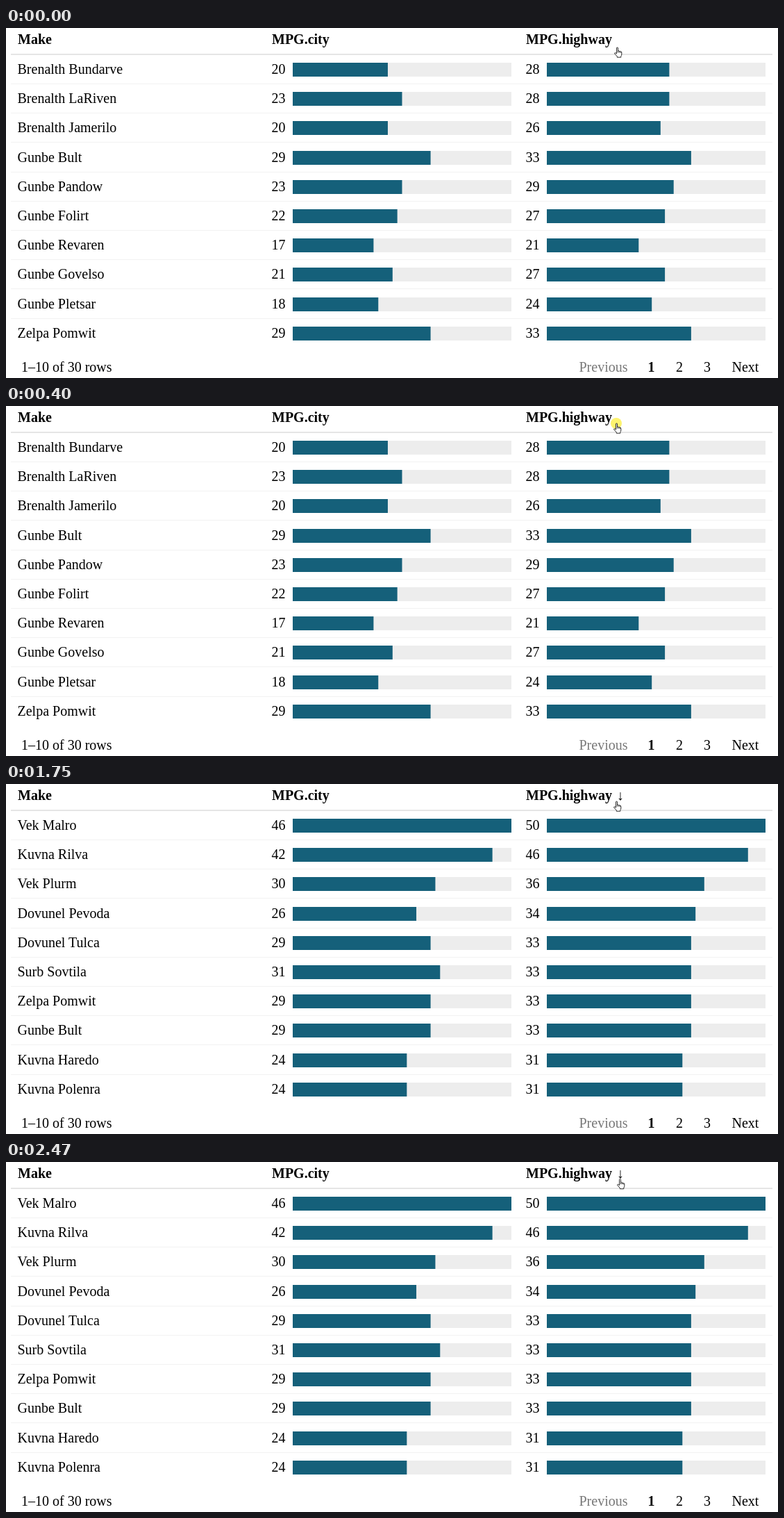
Write an HTML page that moves like this. It is 1112 px wide and 504 px high and loops after 2.54 s.

```html
<!DOCTYPE html>
<html lang="en">
<head>
<meta charset="utf-8">
<title>Sortable table</title>
<style>
html, body { margin: 0; width: 100%; height: 100%; overflow: hidden; background: #fff; }
svg { display: block; font: 20px "Liberation Serif", "Times New Roman", serif; }
.bold { font-weight: bold; }
.middle { text-anchor: middle; }
.muted { fill: #777; }
#click { fill: #fdf36f; mix-blend-mode: multiply; }
#hand { fill: #fff; stroke: #111; stroke-width: .9; stroke-linejoin: round; }
</style>
</head>
<body>
<svg id="stage" width="1112" height="504" viewBox="0 0 1112 504"></svg>
<script>
const LOOP = 2540, PITCH = 42.2, BAR_WIDTH = 315;
const COLUMNS = [16.5, 382.5, 748.5];

// make, city, highway
const cars = [
  ["Brenalth Bundarve", 20, 28], ["Brenalth LaRiven", 23, 28], ["Brenalth Jamerilo", 20, 26],
  ["Gunbe Bult", 29, 33], ["Gunbe Pandow", 23, 29], ["Gunbe Folirt", 22, 27],
  ["Gunbe Revaren", 17, 21], ["Gunbe Govelso", 21, 27], ["Gunbe Pletsar", 18, 24],
  ["Zelpa Pomwit", 29, 33], ["Surb Sovtila", 31, 33], ["Surb Lamvu", 22, 27],
  ["Surb Nevilora", 15, 20], ["Surb Bruwo_Galitore", 18, 26], ["Vek Malro", 46, 50],
  ["Vek Plurm", 30, 36], ["Kuvna Polenra", 24, 31], ["Kuvna Rilva", 42, 46],
  ["Kuvna Haredo", 24, 31], ["Dovunel Tulca", 29, 33], ["Dovunel Pevoda", 26, 34],
  ["Jolistri K83", 17, 22], ["Tovas TP400", 18, 24]
];
const ascending = [...cars].sort((a, b) => a[2] - b[2]);
const descending = [...ascending].reverse();

const text = (x, y, content, cls = "") => `<text x="${x}" y="${y}" class="${cls}">${content}</text>`;
const rect = (x, y, w, h, fill) => `<rect x="${x}" y="${y}" width="${w}" height="${h}" fill="${fill}"/>`;

function meter(column, value, max, y) {
  const x = COLUMNS[column] + 30.5, top = Math.round(50 + y);
  return text(COLUMNS[column], Math.round(66 + y), value)
    + rect(x, top, BAR_WIDTH, 20, "#ededed")
    + rect(x, top, BAR_WIDTH * value / max, 20, "#15607a");
}

function page(list, arrow) {
  const rows = list.slice(0, 10).map(([make, city, highway], i) => {
    const y = i * PITCH;
    return text(COLUMNS[0], Math.round(66 + y), make) + meter(1, city, 46, y) + meter(2, highway, 50, y);
  });
  return `<g class="page">${rows.join("")}${text(884.7, 23, arrow, "bold middle")}</g>`;
}

const rules = Array.from({ length: 9 }, (_, i) => rect(7, Math.round(80 + i * PITCH), 1097, 1, "#f2f2f2"));

document.getElementById("stage").innerHTML =
  ["Make", "MPG.city", "MPG.highway"].map((title, i) => text(COLUMNS[i] + .5, 23, title, "bold")).join("")
  + rect(7, 37, 1097, 2, "#e5e5e5") + rules.join("")
  + page(cars, "") + page(ascending, "↑") + page(descending, "↓")
  + text(22, 495, "1–10 of 30 rows") + text(825.5, 495, "Previous", "muted")
  + text(929.5, 495, "1", "bold middle") + text(970, 495, "2", "middle")
  + text(1010, 495, "3", "middle") + text(1045.5, 495, "Next")
  + `<circle id="click" cx="879" cy="25" r="8"/>
    <g id="hand">
      <path d="M3.5 9.5V1.5Q3.5 .5 4.5 .5T5.5 1.5V5.5Q7 4.8 7.5 6Q9 5.4 9.3 6.6Q10.8 6.3 10.8 7.8V10.5Q10.8 12 9.8 13V14.7H4.3V13.4L.8 9.5Q.3 8.3 1.4 8.2Q2.3 8.3 3.5 9.5Z"/>
      <path d="M5.5 5.5V8M7.5 6V8M9.3 6.6V8.3" fill="none"/>
    </g>`;

const pages = document.querySelectorAll(".page");
const click = document.getElementById("click");
const hand = document.getElementById("hand");

// start time, x, y
const handSteps = [[0, 876, 27.5], [80, 875.5, 26], [130, 875, 24.5], [2410, 877, 24.5], [2470, 880, 24]];
const show = (element, visible) => element.setAttribute("visibility", visible ? "visible" : "hidden");

function draw(now) {
  const t = now % LOOP;
  const current = t < 470 ? 0 : t < 1750 ? 1 : 2;
  pages.forEach((element, i) => show(element, i === current));
  show(click, (t >= 400 && t < 470) || (t >= 1680 && t < 1750));
  const [, x, y] = handSteps.findLast(([start]) => t >= start);
  hand.setAttribute("transform", `translate(${x} ${y})`);
}

const begin = performance.now();
function tick() {
  draw(performance.now() - begin);
  requestAnimationFrame(tick);
}
tick();
</script>
</body>
</html>
```
